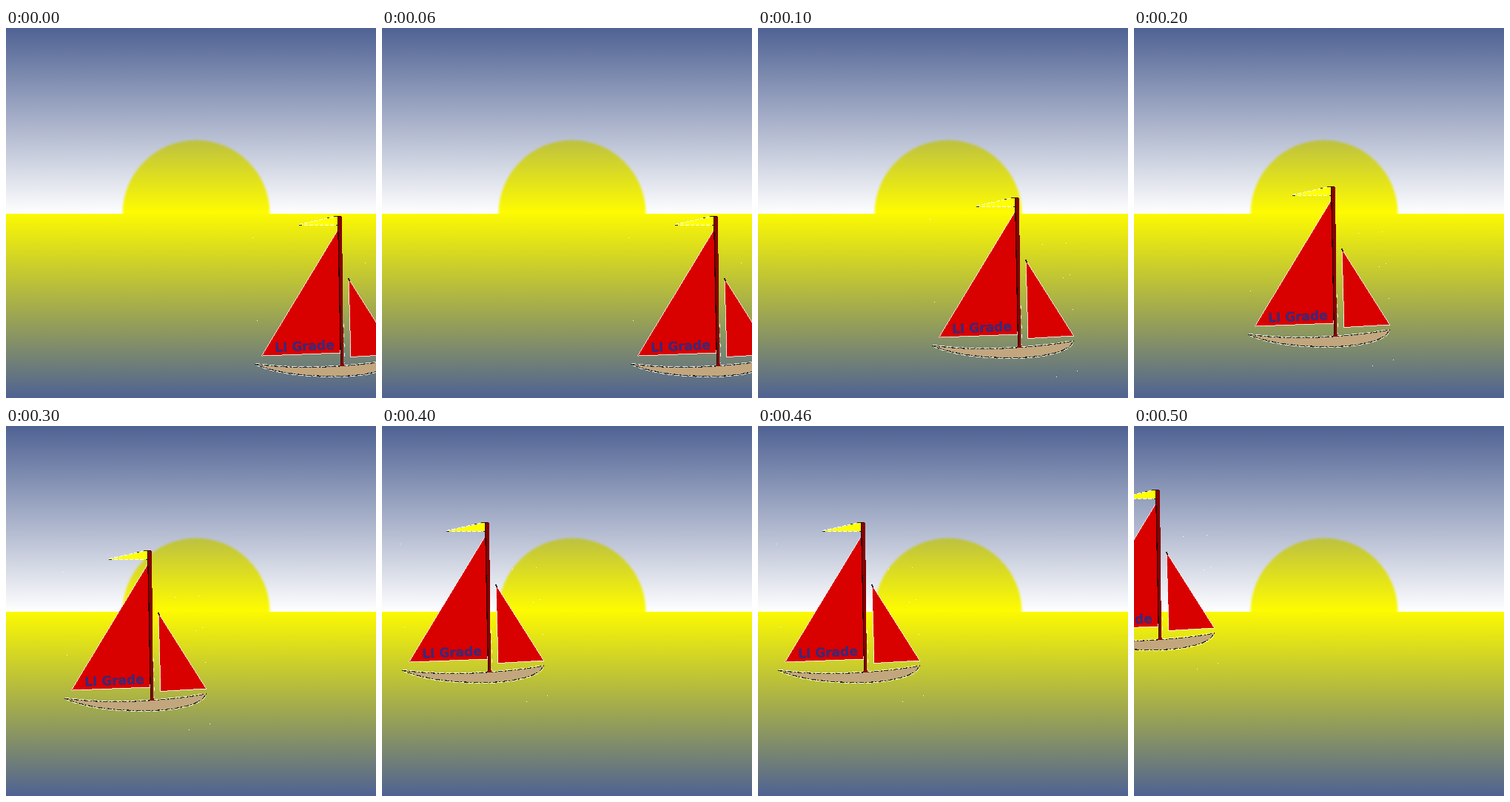
Write an HTML page that moves like this. It is 500 px wide and 500 px high and loops after 0.6 s.

```html
<!DOCTYPE html>
<html lang="en">
<head>
<meta charset="utf-8">
<title>Sailing boat at sunset</title>
<style>
html, body { margin: 0; width: 100%; height: 100%; overflow: hidden; }
svg { display: block; width: 100vw; height: 100vh; }
text { font: bold 17px "DejaVu Sans", sans-serif; }
</style>
</head>
<body>
<svg viewBox="0 0 500 500">
  <defs>
    <linearGradient id="sky" x2="0" y2="1">
      <stop stop-color="#4f6293"/><stop offset="1" stop-color="#fff"/>
    </linearGradient>
    <linearGradient id="sea" x2="0" y2="1">
      <stop stop-color="#fcf902"/><stop offset="1" stop-color="#4f6293"/>
    </linearGradient>
    <linearGradient id="glow" gradientUnits="userSpaceOnUse" x1="0" y1="151" x2="0" y2="251">
      <stop stop-color="#bcc040"/><stop offset="1" stop-color="#fffc00"/>
    </linearGradient>
    <clipPath id="above"><path d="M0 0H500V251H0Z"/></clipPath>
    <path id="hull" d="M235.500 429Q285 436 340 432.500Q390 430 426.500 423Q421 434 401 439Q375 446 340 445.500Q272 445 235.500 429Z"/>
  </defs>

  <rect width="500" height="251" fill="url(#sky)"/>
  <g clip-path="url(#above)">
    <circle cx="257" cy="251" r="99.500" fill="url(#glow)" style="filter:blur(1.7px)"/>
  </g>
  <rect y="251" width="500" height="249" fill="url(#sea)"/>

  <g id="boat" shape-rendering="crispEdges">
    <path id="spray" fill="#fff"/>
    <path d="M295 241L347 229.500V241Z" fill="#ffff00"/>
    <path d="M295 240.500L347 229M295 241.500H347" fill="none" stroke="#fff" stroke-dasharray="5 2"/>
    <path d="M295 241.500h4M333 232l3-1M342 230l5-1M345 241.500h3" stroke="#222"/>
    <g fill="#d90000" stroke="#fff" stroke-width=".8">
      <path d="M348 247L244.500 418L351 414Z"/>
      <path d="M362 314L426.500 416L365 419.500Z"/>
    </g>
    <path d="M361.500 313l2 4" stroke="#222" stroke-width="1.500"/>
    <path d="M355.500 375L356.500 428" stroke="#fff" stroke-width=".8" stroke-dasharray="5 8"/>
    <use href="#hull" fill="#c2a67e"/>
    <path d="M235.500 428Q285 435 340 431.500Q390 429 426.500 422M426 426Q421 435 401 440Q375 447 340 446.500Q272 446 238 431" fill="none" stroke="#fff" stroke-width=".8" stroke-dasharray="7 3"/>
    <use href="#hull" fill="none" stroke="#222" stroke-width="1.100" stroke-dasharray="6 3 2 2"/>
    <path d="M347 230Q350 228 353 230L355 428L357 432H350L351 428Z" fill="#850000"/>
    <path d="M347.500 230L351.500 429M347 229.500H352" fill="none" stroke="#260000" stroke-width="1.200"/>
    <text transform="translate(262.500 412.500) rotate(-2.500)" fill="#39297f" stroke="#58204f" stroke-width=".4">LI Grade</text>
  </g>
</svg>
<script>
const boat = document.getElementById("boat");
const drops = [[232, 258], [238, 370], [384, 292], [416, 290], [421, 333],
  [412, 337], [425, 380], [403, 471], [431, 463]];
document.getElementById("spray").setAttribute("d",
  drops.map(([x, y]) => `M${x} ${y}h1v1h-1z`).join(""));

const stops = [[101, 25], [0, 0], [-81, -15], [-156, -61], [-208, -99], [-318, -143]];
const STEP = 100;
const start = performance.now();

// The boat jumps from stop to stop and holds there.
function draw() {
  const time = performance.now() - start;
  const [x, y] = stops[Math.floor(time / STEP) % stops.length];
  boat.setAttribute("transform", `translate(${x} ${y})`);
  requestAnimationFrame(draw);
}
draw();
</script>
</body>
</html>
```
